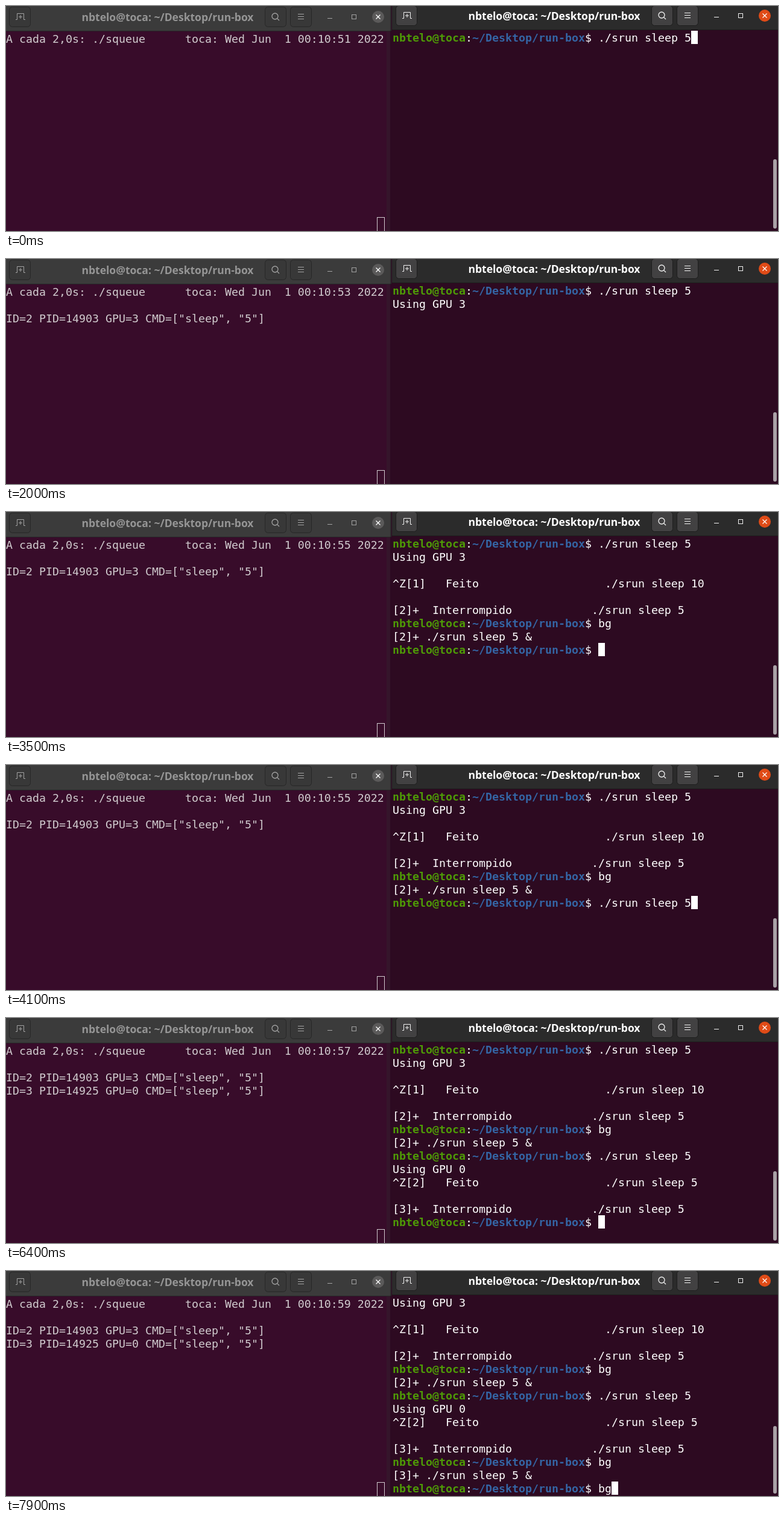
Animation, 1280 px wide and 373 px high, one loop 8000 ms. Source, as an HTML page with a canvas:

```html
<!DOCTYPE html>
<html lang="pt">
<head>
<meta charset="utf-8">
<title>Terminals</title>
<style>
html, body { margin: 0; width: 100%; height: 100%; overflow: hidden; background: #2d0a21; }
canvas { display: block; }
</style>
</head>
<body>
<canvas id="stage" width="1280" height="373"></canvas>
<script>
const c = document.getElementById('stage').getContext('2d');
const LOOP = 8000, STEP = 100, BLINK = 600;
const CELL = 11, ROW = 22, ROWS = 15;
const MONO = '18.27px "DejaVu Sans Mono", monospace';
const USER = 'nbtelo@toca', PATH = '~/Desktop/run-box';
const RUN = './srun sleep 5';

// "$ " at the start of a line stands for the whole prompt
const suspend = (n, done) =>
  `^Z[${n - 1}]   Feito`.padEnd(32) + done + '\n\n' + `[${n}]+  Interrompido`.padEnd(30) + RUN + '\n$ ';
const resume = n => `\n[${n}]+ ${RUN} &\n$ `;

// [time, added output, time of the key press if earlier]; \r starts the line afresh
const session = [
  [0, '$ ' + RUN, -300],
  [600, '\n'],
  [700, 'Using GPU 3\n'],
  [1400, '\n'],
  [2800, suspend(2, './srun sleep 10')],
  [3200, 'b'],
  [3500, 'g' + resume(2)],
  [3900, 'bg'],
  [4100, '\r$ ' + RUN],
  [4700, '\nUsing GPU 0\n'],
  [6400, suspend(3, RUN), 6100],
  [7400, 'b'],
  [7500, 'g' + resume(3)],
  [7900, 'bg']
];

function rect(x, y, w, h, color) {
  c.fillStyle = color;
  c.fillRect(x, y, w, h);
}

function roundRect(x, y, w, h, r, color) {
  c.fillStyle = color;
  c.beginPath();
  c.roundRect(x, y, w, h, r);
  c.fill();
}

function line(...points) {
  c.beginPath();
  for (let i = 0; i < points.length; i += 2) c.lineTo(points[i], points[i + 1]);
  c.stroke();
}

function text(str, x, y, color, bold) {
  c.font = (bold ? 'bold ' : '') + MONO;
  c.fillStyle = color;
  c.fillText(str, x, y);
}

// Every icon is centred on y = 18
function header(dx, dy, s) {
  c.save();
  c.translate(dx, dy);
  rect(-1, 0, 640, 41, s.bar);
  rect(-1, 41, 640, 1, s.edge);
  c.lineWidth = 1;
  for (const x of [5, 429, 471]) {
    roundRect(x + .5, 1.5, 35, 33, 5, s.button);
    c.strokeStyle = s.edge;
    c.stroke();
  }

  c.strokeStyle = s.icon;
  line(16, 22.5, 18.5, 22.5, 18.5, 12.5, 29.5, 12.5, 29.5, 22.5, 32, 22.5);
  line(24, 15, 24, 21);
  line(21, 18, 27, 18);
  for (const y of [13.5, 17.5, 21.5]) line(484, y, 494, y);
  line(533, 20.5, 541, 20.5);
  c.strokeRect(573.5, 14.5, 7, 7);
  c.lineWidth = 1.3;
  c.beginPath();
  c.arc(446, 17, 5, 0, 7);
  c.stroke();
  line(449.6, 20.6, 453, 24);

  roundRect(607, 8, 20, 20, 10, s.close);
  c.strokeStyle = '#fff';
  line(613.5, 14.5, 620.5, 21.5);
  line(620.5, 14.5, 613.5, 21.5);

  c.font = 'bold 17.5px "Noto Sans", "Open Sans", sans-serif';
  c.textAlign = 'center';
  c.fillStyle = s.title;
  c.fillText(USER + ': ' + PATH, 268, 24.5);
  c.restore();
}

function leftWindow(t) {
  const ink = '#d0cbce';
  const refreshes = Math.max(0, Math.floor((t - 1285) / 2010) + 1);
  const put = (row, str) => text(str, 0, 61 + row * ROW, ink);
  const job = (row, id, pid, gpu) => put(row, `ID=${id} PID=${pid} GPU=${gpu} CMD=["sleep", "5"]`);
  rect(0, 0, 640, 373, '#380c2a');
  rect(631, 42, 6, 331, '#35152b');
  header(0, 0, {
    bar: '#3b3b3b', button: '#383838', edge: '#272727', icon: '#a3a3a3', title: '#959595', close: '#5b5a5a'
  });
  rect(637, 0, 3, 373, 'rgba(20,8,18,.35)');
  put(0, 'A cada 2,0s: ./squeue'.padEnd(27) + `toca: Wed Jun  1 00:10:${51 + 2 * refreshes} 2022`);
  if (refreshes > 0) job(2, 2, 14903, 3);
  if (refreshes > 2) job(3, 3, 14925, 0);
  c.strokeStyle = ink;
  c.lineWidth = 1;
  c.strokeRect(615.5, 350.5, 12, 24);
}

function shellLine(str, y) {
  const put = (s, col, color, bold) => text(s, 641 + col * CELL, y, color, bold);
  if (str[0] !== '$') return put(str, 0, '#fff');
  put(USER, 0, '#4e9a06', true);
  put(':', 11, '#fff');
  put(PATH, 12, '#3465a4', true);
  put(str, 29, '#fff');
}

function rightWindow(t) {
  const past = session.filter(e => e[0] <= t);
  const lines = past.map(e => e[1]).join('').split('\n').map(s => s.split('\r').pop());
  const scroll = Math.max(0, lines.length - ROWS);
  const view = lines.slice(scroll);
  rect(640, 0, 640, 373, '#2d0a21');
  view.forEach((str, row) => shellLine(str, 59 + row * ROW));

  const [at, , key = at] = past[past.length - 1];
  if (Math.floor((t - key) / BLINK) % 2 === 0) {
    const last = view[view.length - 1];
    const col = last.length + (last[0] === '$' ? 29 : 0);
    rect(641 + col * CELL, 41 + (view.length - 1) * ROW, CELL, ROW, '#fff');
  }

  const top = 254 + 3 * scroll;
  roundRect(1272, top, 6, 369 - top, 3, '#aaa2a7');
  header(641, -2, {
    bar: '#2b2b2b', button: '#424142', edge: '#1d1d1d', icon: '#f2f2f2', title: '#fff', close: '#e04b17'
  });
}

const start = performance.now();
function tick() {
  const now = (performance.now() - start) % LOOP;
  const t = Math.floor(now / STEP) * STEP;
  leftWindow(t);
  rightWindow(t);
  requestAnimationFrame(tick);
}
tick();
</script>
</body>
</html>
```
